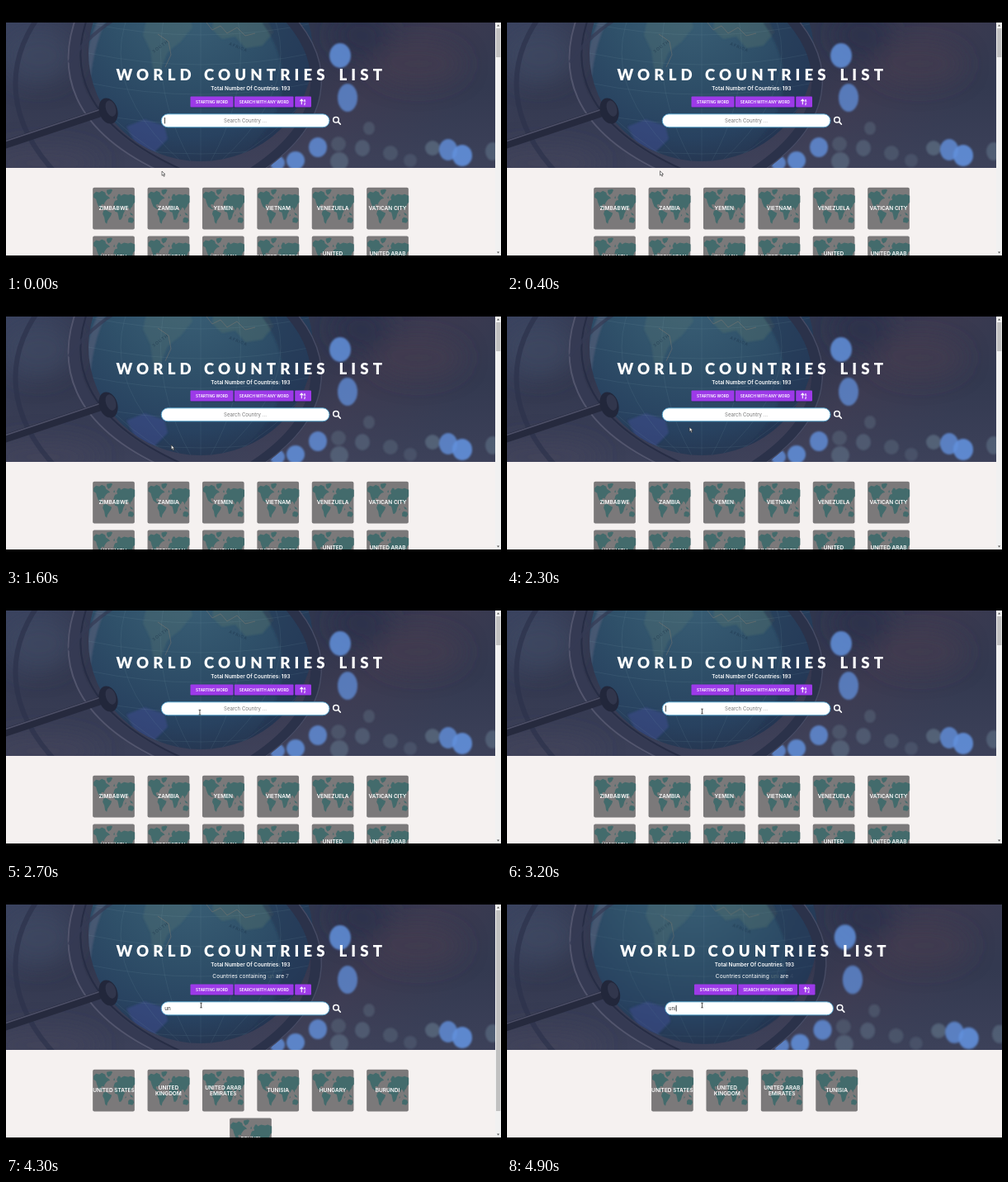
Animation, 600 px wide and 322 px high, one loop 5000 ms. Source, as an HTML page:

```html
<!DOCTYPE html>
<html lang="en">
<head>
<meta charset="utf-8">
<title>World Countries List</title>
<style>
  html, body { margin: 0; width: 100%; height: 100%; overflow: hidden; background: #000; }
  svg { display: block; width: 100vw; height: 100vh; }
  text { font-family: Inter, "Open Sans", sans-serif; fill: #fff; }
  .title { font: 900 18.6px Lato, sans-serif; letter-spacing: 5.1px; }
  .mid { text-anchor: middle; }
  .total { font-size: 6.35px; font-weight: 600; }
  .found { font-size: 6.65px; }
  .btn { font-size: 4.65px; font-weight: 600; }
  .hint { font-size: 6.1px; fill: #777; }
  .typed { font-size: 6.3px; fill: #333; }
  .label { font-size: 6.5px; font-weight: 600; text-anchor: middle; }
  .map { font-size: 5px; fill: #182c43; opacity: .55; letter-spacing: 1px; }
</style>
</head>
<body>
<svg viewBox="0 0 600 322" preserveAspectRatio="none">
  <defs>
    <linearGradient id="room" x2="1" y2=".35">
      <stop offset="0" stop-color="#3b4461"/>
      <stop offset=".22" stop-color="#33384f"/>
      <stop offset=".6" stop-color="#31374f"/>
      <stop offset=".8" stop-color="#3c3a50"/>
      <stop offset="1" stop-color="#333950"/>
    </linearGradient>
    <linearGradient id="floor" x2="0" y2="1">
      <stop offset=".45" stop-color="#42465f" stop-opacity="0"/>
      <stop offset="1" stop-color="#42465f" stop-opacity=".7"/>
    </linearGradient>
    <radialGradient id="ocean" cx=".45" cy=".25" r=".75">
      <stop offset="0" stop-color="#3b6177"/>
      <stop offset=".5" stop-color="#2f5069"/>
      <stop offset=".85" stop-color="#284260"/>
      <stop offset="1" stop-color="#263853"/>
    </radialGradient>
    <filter id="soft" x="-20%" y="-20%" width="140%" height="140%"><feGaussianBlur stdDeviation="1.2"/></filter>
    <filter id="haze" x="-40%" y="-40%" width="180%" height="180%"><feGaussianBlur stdDeviation="14"/></filter>
    <clipPath id="ball"><ellipse cx="236" cy="57" rx="136" ry="131"/></clipPath>
    <g id="card">
      <rect width="50.7" height="50.6" rx="2" fill="#7b797a"/>
      <g fill="#436b6c">
        <path d="M1 8l3-3 4 1 3-2 4 2 1 3 3 2 2 2-3 1-2 2-2 3 0 2-2-1-2 1 1 3 3 2-3 0-4-3-2-5-1-4-3-2z"/>
        <path d="M17 3l5-1 2 1-2 4-3 2-2-3z"/>
        <path d="M13 28l3-1 3 2 4 2-1 3-2 3-2 3-1 4-2-2-1-6-2-4z"/>
        <path d="M27 22l3-1 4 1 2 2 1 3 2 1-2 4-1 4-2 3-2 0-1-5-1-4-3-1-1-4z"/>
        <path d="M26 18l1-2 3-1-1-3 2-4 2 0 1 2 4-2 5 1 3-1 5 2v8l-2 2-1 3-2 2-1 3-1-3-2-1-2 4-2-4-3-2-2 1-2-1-3-1-3 1z"/>
        <path d="M43 38l2-2 4 1 1 3-2 3-5-1zM39 35l1-3 .6 2zM25 13l1-3 1 3zM45 30l3 2 1 2-3-1z"/>
      </g>
    </g>
  </defs>

  <g id="photo">
    <rect y="10" width="600" height="196" fill="url(#room)"/>
    <rect y="10" width="600" height="196" fill="url(#floor)"/>
    <g filter="url(#haze)">
      <ellipse cx="500" cy="70" rx="55" ry="26" fill="#443b4f" opacity=".6"/>
      <ellipse cx="40" cy="60" rx="45" ry="35" fill="#424b66" opacity=".6"/>
      <ellipse cx="430" cy="35" rx="35" ry="30" fill="#2a3049" opacity=".7"/>
      <ellipse cx="45" cy="190" rx="70" ry="20" fill="#45435a" opacity=".6"/>
    </g>
    <g id="bokeh" filter="url(#soft)"></g>
    <ellipse cx="236" cy="57" rx="136" ry="131" fill="url(#ocean)"/>
    <g clip-path="url(#ball)">
      <g filter="url(#soft)">
        <path d="M172 8l50 0 4 18-14 17-16 13-10 24-8-4-3-22-9-19z" fill="#526f70" opacity=".4"/>
        <path d="M252 10h62l10 22-13 16-21 3-12-14-16 3-12-12z" fill="#56706c" opacity=".4"/>
        <path d="M146 146l22-9 24 8 4 16-16 16-20-4z" fill="#3d4c8a" opacity=".6"/>
        <path d="M118 14Q100 50 97 100" fill="none" stroke="#59627a" stroke-width="9" opacity=".6"/>
        <path d="M310 20C355 80 340 145 270 196H390V10z" fill="#25354f" opacity=".5"/>
      </g>
      <g id="grid" fill="none" stroke="#8fb2bb" stroke-width=".5" opacity=".22"></g>
      <path d="M243 20l7 9 10-5 8 9 12-7 10 10 12-3M184 34l13 9 3 16-7 15" fill="none" stroke="#a58b75" stroke-width=".7" opacity=".45"/>
      <text class="map" transform="translate(179 57) rotate(-36)">SOUTH</text>
      <text class="map" transform="translate(270 47) rotate(22)">AFRICA</text>
    </g>
    <g fill="none" stroke-linecap="round">
      <path d="M40 12C-2 70 0 140 62 204" stroke="#2d334c" stroke-width="6" opacity=".7"/>
      <path d="M94 8C66 70 78 147 203 202" stroke="#353a53" stroke-width="14"/>
      <path d="M87 8C60 76 75 151 195 204" stroke="#52556d" stroke-width="2"/>
      <path d="M101 8C75 73 91 143 213 198" stroke="#272d45" stroke-width="2"/>
      <path d="M337 8C396 69 391 144 293 205" stroke="#2b324a" stroke-width="12"/>
      <path d="M345 8C403 70 397 145 302 205" stroke="#474c65" stroke-width="1.3"/>
      <path d="M148 8C129 16 101 34 77 67" stroke="#363b54" stroke-width="4" opacity=".7"/>
      <path d="M-5 169L124 126" stroke="#262a3e" stroke-width="10"/>
      <path d="M-5 165L118 124" stroke="#4d4f67" stroke-width="1.6"/>
    </g>
    <ellipse cx="124" cy="127" rx="11" ry="16" transform="rotate(-18 124 127)" fill="#22273b"/>
    <ellipse cx="127" cy="124" rx="6" ry="10" transform="rotate(-18 127 124)" fill="#31364c"/>
  </g>

  <rect y="196" width="600" height="110" fill="#f5f1f0"/>
  <g id="cards"></g>

  <g id="hero">
    <g id="head">
      <text class="title" x="133.5" y="90">WORLD</text>
      <text class="title" x="240" y="90">COUNTRIES</text>
      <text class="title" x="403.5" y="90">LIST</text>
      <text class="mid total" x="296.5" y="102">Total Number Of Countries: 193</text>
    </g>
    <text class="mid found" id="found" x="296.5" y="108.6">Countries containing <tspan id="word" fill="#5a7078"></tspan> are <tspan id="count"></tspan></text>
    <g id="form">
      <rect x="224" y="110.5" width="146" height="13" rx="1" fill="#1d1e45" opacity=".4"/>
      <g fill="#9d3ae8">
        <rect x="223.5" y="109.6" width="52" height="12.9" rx="1"/>
        <rect x="276.8" y="109.6" width="71.8" height="12.9" rx="1"/>
        <rect x="350.2" y="109.6" width="19.8" height="12.9" rx="1"/>
      </g>
      <text class="mid btn" x="249.6" y="117.8">STARTING WORD</text>
      <text class="mid btn" x="312.8" y="117.8">SEARCH WITH ANY WORD</text>
      <path d="M358.3 119.3v-6M356.4 115.1l1.9-2 1.9 2" fill="none" stroke="#fff" stroke-width="1.1"/>
      <text x="360.6" y="115.7" font-size="4" font-weight="700">A</text>
      <text x="360.8" y="119.5" font-size="4" font-weight="700">Z</text>
      <rect x="188.2" y="130.8" width="203.8" height="16" rx="8" fill="#fff" stroke="#4a9cc8" stroke-width=".9"/>
      <text class="mid hint" id="hint" x="290" y="140.8">Search Country ...</text>
      <text class="typed" id="typed" x="192.3" y="140.7"></text>
      <rect id="caret" y="135" width=".8" height="7.4" fill="#222"/>
      <circle cx="400" cy="137.7" r="3.3" fill="none" stroke="#fff" stroke-width="1.5"/>
      <path d="M402.5 140.2l2.7 2.8" stroke="#fff" stroke-width="1.8" stroke-linecap="round"/>
    </g>
  </g>

  <g id="bar">
    <rect x="593" y="20" width="7" height="282" fill="#f1f1f1"/>
    <rect id="thumb" x="594" y="27" width="5.4" fill="#c1c1c1"/>
    <path d="M595 24.6l1.6-2 1.6 2zM595 297.6l1.6 2 1.6-2z" fill="#505050"/>
  </g>
  <path id="arrow" d="M0 0v5.3l1.3-1.1 1 2.2 1-.5-1-2.1h1.7z" fill="#fff" stroke="#222" stroke-width=".6"/>
  <path id="beam" d="M-1.3-2.8h2.6M0-2.8v5.6M-1.3 2.8h2.6" fill="none" stroke="#222" stroke-width=".75"/>
  <path d="M0 0h600v20H0zM0 302h600v20H0z"/>
</svg>
<script>
const LOOP = 5000, STEP = 100, BLINK = 530;
const $ = id => document.getElementById(id);
const NS = "http://www.w3.org/2000/svg";

function add(parent, tag, attrs, text) {
  const el = document.createElementNS(NS, tag);
  for (const k in attrs) el.setAttribute(k, attrs[k]);
  if (text) el.textContent = text;
  parent.appendChild(el);
  return el;
}
const show = (id, on) => $(id).setAttribute("visibility", on ? "visible" : "hidden");
const move = (id, x, y) => $(id).setAttribute("transform", `translate(${x} ${y})`);

const states = [
  { at: 0, word: "", thumb: 35, names: "ZIMBABWE,ZAMBIA,YEMEN,VIETNAM,VENEZUELA,VATICAN CITY,VANUATU,UZBEKISTAN,URUGUAY,UNITED STATES,UNITED|KINGDOM,UNITED ARAB|EMIRATES" },
  { at: 3400, word: "u", count: 52, thumb: 102, names: "VENEZUELA,VANUATU,UZBEKISTAN,URUGUAY,UNITED STATES,UNITED|KINGDOM,UNITED ARAB|EMIRATES,UKRAINE,UGANDA,TUVALU,TURKMENISTAN,TURKEY" },
  { at: 3700, word: "un", count: 7, thumb: 243, names: "UNITED STATES,UNITED|KINGDOM,UNITED ARAB|EMIRATES,TUNISIA,HUNGARY,BURUNDI,BRUNEI" },
  { at: 4600, word: "uni", count: 4, thumb: 0, names: "UNITED STATES,UNITED|KINGDOM,UNITED ARAB|EMIRATES,TUNISIA" }
];

// Pointer path: time, x, y
const path = [[0, 189, 200], [800, 182, 199.5], [1600, 200.3, 175.6], [2300, 221.2, 154], [2800, 236.5, 142], [5000, 236.5, 142]];

// Blurred lights: x, y, rx, ry, opacity
const blue = [[405, 60, 13, 15, .85], [414, 111, 12, 17, .75], [329, 190, 9, 9, .8], [351, 187, 11, 11, .85],
  [378, 171, 11, 12, .8], [536, 174, 11, 13, .8], [553, 181, 12, 13, .9]];
const pale = [[404, 188, 11, 11, .45], [403, 167, 9, 9, .3], [432, 172, 9, 10, .4], [466, 178, 9, 9, .3],
  [517, 172, 9, 9, .5], [590, 176, 9, 11, .45], [440, 148, 7, 8, .3], [490, 187, 8, 8, .25]];
const lights = (list, fill) => list.forEach(([cx, cy, rx, ry, opacity]) =>
  add($("bokeh"), "ellipse", { cx, cy, rx, ry, opacity, fill }));
lights(pale, "#6c8396");
lights(blue, "#6290dc");

for (let i = -3; i <= 3; i++) {
  add($("grid"), "path", { d: `M${236 + i * 12} -74Q${236 + i * 85} 57 ${236 + i * 12} 188` });
  add($("grid"), "path", { d: `M100 ${57 + i * 36}Q236 ${85 + i * 36} 372 ${57 + i * 36}` });
}

function drawCards(names, mid) {
  const box = $("cards");
  box.replaceChildren();
  names.forEach((name, i) => {
    const row = Math.floor(i / 6), inRow = Math.min(6, names.length - row * 6);
    const x = mid - 25.35 + (i % 6 - (inRow - 1) / 2) * 66.4, y = 219.8 + row * 58.7;
    add(box, "use", { href: "#card", x, y });
    const lines = name.split("|");
    lines.forEach((line, k) =>
      add(box, "text", { class: "label", x: x + 25.35, y: y + 27.6 + (k - (lines.length - 1) / 2) * 7.6 }, line));
  });
}

let current;
function applyState(s) {
  current = s;
  const width = s.thumb ? 593 : 600, lift = s.word ? 7 : 0;
  drawCards(s.names.split(","), width / 2);
  $("photo").setAttribute("transform", `translate(0 108) scale(${width / 593}) translate(0 -108)`);
  move("hero", (width - 593) / 2, 0);
  move("head", 0, -lift);
  move("form", 0, lift);
  show("found", s.word);
  show("hint", !s.word);
  show("bar", s.thumb);
  $("thumb").setAttribute("height", s.thumb);
  $("word").textContent = $("typed").textContent = s.word;
  $("count").textContent = s.count || "";
  $("caret").setAttribute("x", 192 + (s.word ? $("typed").getComputedTextLength() + .3 : 0));
}

function pointerAt(t) {
  const i = Math.max(1, path.findIndex(p => p[0] >= t));
  const [a, b] = [path[i - 1], path[i]];
  const k = (t - a[0]) / (b[0] - a[0]), e = k * k * (3 - 2 * k);
  return [a[1] + (b[1] - a[1]) * e, a[2] + (b[2] - a[2]) * e];
}

function render(time) {
  const t = Math.floor(time % LOOP / STEP) * STEP;
  const s = states.filter(v => v.at <= t).pop();
  if (s !== current) applyState(s);

  const since = t - (s.word ? s.at : 600);
  show("caret", (since + 2 * BLINK) % (2 * BLINK) < BLINK);
  $("count").setAttribute("fill-opacity", Math.min(1, Math.max(0, (since - 250) / 600)));

  const [x, y] = pointerAt(t), typing = y < 147;
  show("arrow", !typing);
  show("beam", typing);
  move(typing ? "beam" : "arrow", x, y);
}

const start = performance.now();
function tick() {
  render(performance.now() - start);
  requestAnimationFrame(tick);
}
tick();
</script>
</body>
</html>
```
